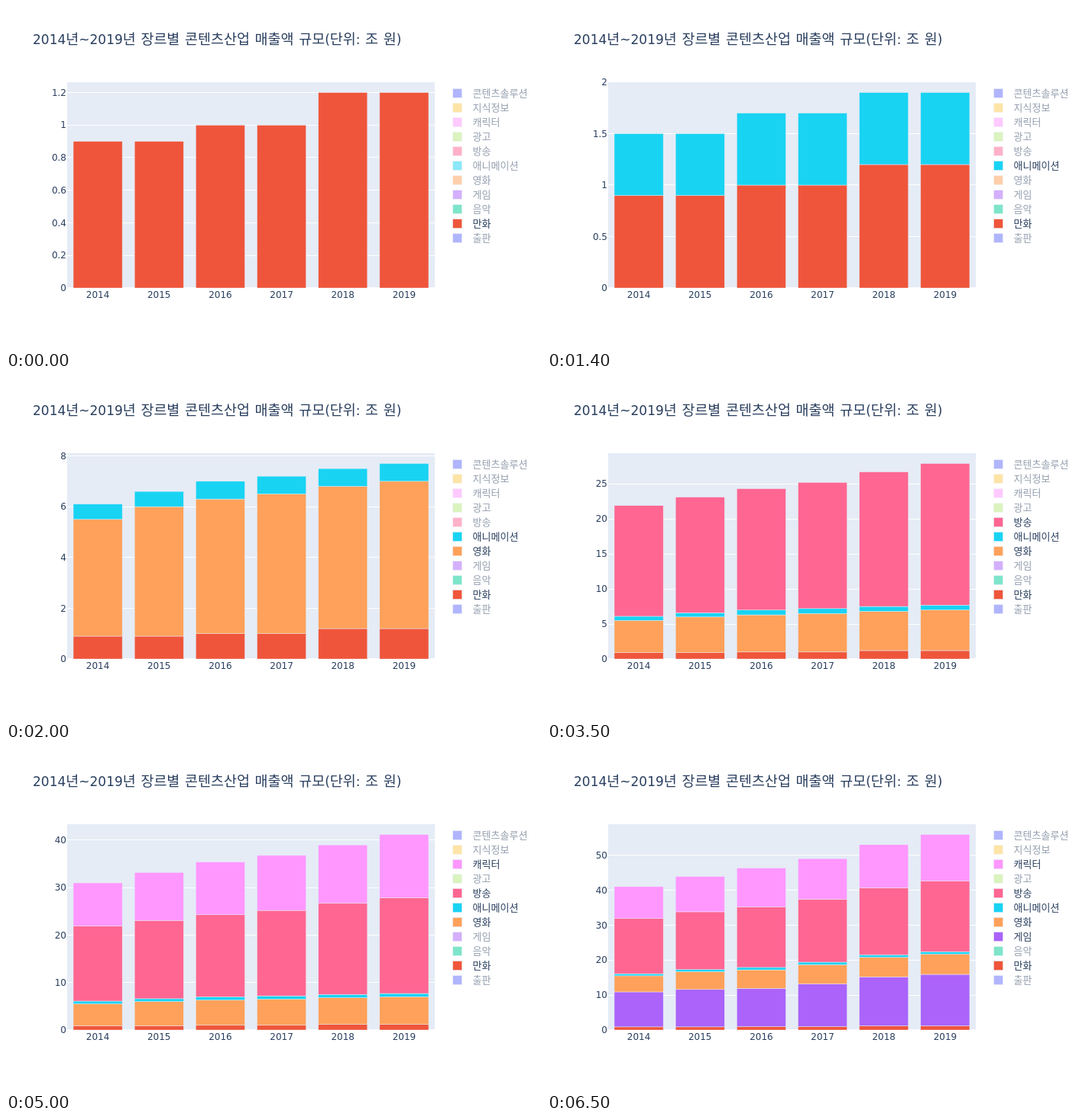
An HTML page for the animation above (8 s loop, 700 by 450 pixels).

```html
<!DOCTYPE html>
<html lang="ko">
<head>
<meta charset="utf-8">
<style>
  html, body { margin: 0; width: 100%; height: 100%; overflow: hidden; background: #fff; }
  svg { display: block; width: 700px; height: 450px; }
  text { font: 12px "DejaVu Sans", Verdana, sans-serif; fill: #2a3f5f; white-space: pre; }
  .title { font-size: 17px; word-spacing: 1.2px; }
  .ko { font-family: "Noto Sans CJK KR", "Noto Sans CJK", "Noto Sans CJK JP", sans-serif; font-size: 1.087em; font-weight: 300; }
  .grid { stroke: #fff; shape-rendering: crispEdges; }
  .box { stroke: #e5ecf6; stroke-width: .5; }
</style>
</head>
<body>
<svg viewBox="0 0 700 450">
  <defs><clipPath id="area"><rect x="80" y="100" width="481" height="270"/></clipPath></defs>
  <rect x="80" y="100" width="481" height="270" fill="#e5ecf6"/>
  <g id="chart"></g>
  <g id="years"></g>
  <g id="legend"></g>
  <g id="title"></g>
</svg>
<script>
const LEFT = 80, BOTTOM = 370, WIDTH = 481, HEIGHT = 270, LOOP = 8000;
const SLOT = WIDTH / 6, BAR = SLOT * 0.8;

// Stacking order, bottom to top: name, colour, yearly values where shown
const series = [
  ["출판", "#636efa"],
  ["만화", "#ef553b", [0.9, 0.9, 1, 1, 1.2, 1.2]],
  ["음악", "#00cc96"],
  ["게임", "#ab63fa", [10, 10.7, 10.9, 12.2, 14, 14.7]],
  ["영화", "#ffa15a", [4.6, 5.1, 5.3, 5.5, 5.6, 5.8]],
  ["애니메이션", "#19d3f3", [0.6, 0.6, 0.7, 0.7, 0.7, 0.7]],
  ["방송", "#ff6692", [15.8, 16.5, 17.3, 18, 19.2, 20.2]],
  ["광고", "#b6e880"],
  ["캐릭터", "#ff97ff", [9.1, 10.1, 11.1, 11.6, 12.3, 13.3]],
  ["지식정보", "#fecb52"],
  ["콘텐츠솔루션", "#636efa"]
];

// Each scene switches on one more series
const scenes = [
  { at: 0, add: "만화", step: 0.2 },
  { at: 500, add: "애니메이션", step: 0.5 },
  { at: 2000, add: "영화", step: 2 },
  { at: 3500, add: "방송", step: 5 },
  { at: 5000, add: "캐릭터", step: 10 },
  { at: 6500, add: "게임", step: 10 }
];

const $ = id => document.getElementById(id);
const text = (x, y, str, attrs = "") =>
  `<text x="${x}" y="${y}" ${attrs}>` +
  str.replace(/[가-힣]+/g, '<tspan class="ko">$&</tspan>') + "</text>";
const box = (x, y, w, h, fill) =>
  `<rect class="box" x="${x}" y="${y}" width="${w}" height="${h}" fill="${fill}"/>`;

function drawChart(active, step) {
  const base = Array(6).fill(0);
  const shown = series.filter(([name]) => active.includes(name));
  const totals = base.map((_, i) => shown.reduce((sum, s) => sum + s[2][i], 0));
  const range = Math.max(...totals) / 0.95;
  const toY = v => BOTTOM - v / range * HEIGHT;

  let grid = "", bars = "";
  for (let k = 0; k * step <= range + 1e-6; k++) {
    const y = toY(k * step), line = Math.ceil(y) - 0.5;
    grid += `<path class="grid" d="M${LEFT} ${line}h${WIDTH}"/>`;
    grid += text(79, y + 4.2, String(+(k * step).toFixed(1)), 'text-anchor="end"');
  }
  for (const [, color, values] of shown) {
    values.forEach((v, i) => {
      const top = toY(base[i] + v);
      bars += box(LEFT + SLOT * i + (SLOT - BAR) / 2, top, BAR, toY(base[i]) - top, color);
      base[i] += v;
    });
  }
  $("chart").innerHTML = grid + `<g clip-path="url(#area)">${bars}</g>`;
}

function drawLegend(active) {
  $("legend").innerHTML = [...series].reverse().map(([name, color], i) => {
    const y = 114.5 + 19 * i;
    return `<g opacity="${active.includes(name) ? 1 : 0.5}">` +
      box(584.62, y - 6, 12, 12, color) + text(610.62, y + 4.3, name) + "</g>";
  }).join("");
}

let current = -1;
function update() {
  const t = performance.now() % LOOP;
  const index = scenes.filter(s => s.at <= t).length - 1;
  if (index !== current) {
    current = index;
    const active = scenes.slice(0, index + 1).map(s => s.add);
    drawChart(active, scenes[index].step);
    drawLegend(active);
  }
  requestAnimationFrame(update);
}

$("title").innerHTML = text(35, 50, "2014년~2019년 장르별 콘텐츠산업 매출액 규모(단위: 조 원)", 'class="title"');
for (let i = 0; i < 6; i++)
  $("years").innerHTML += text(LEFT + SLOT * (i + 0.5), 383, String(2014 + i), 'text-anchor="middle"');
update();
</script>
</body>
</html>
```
